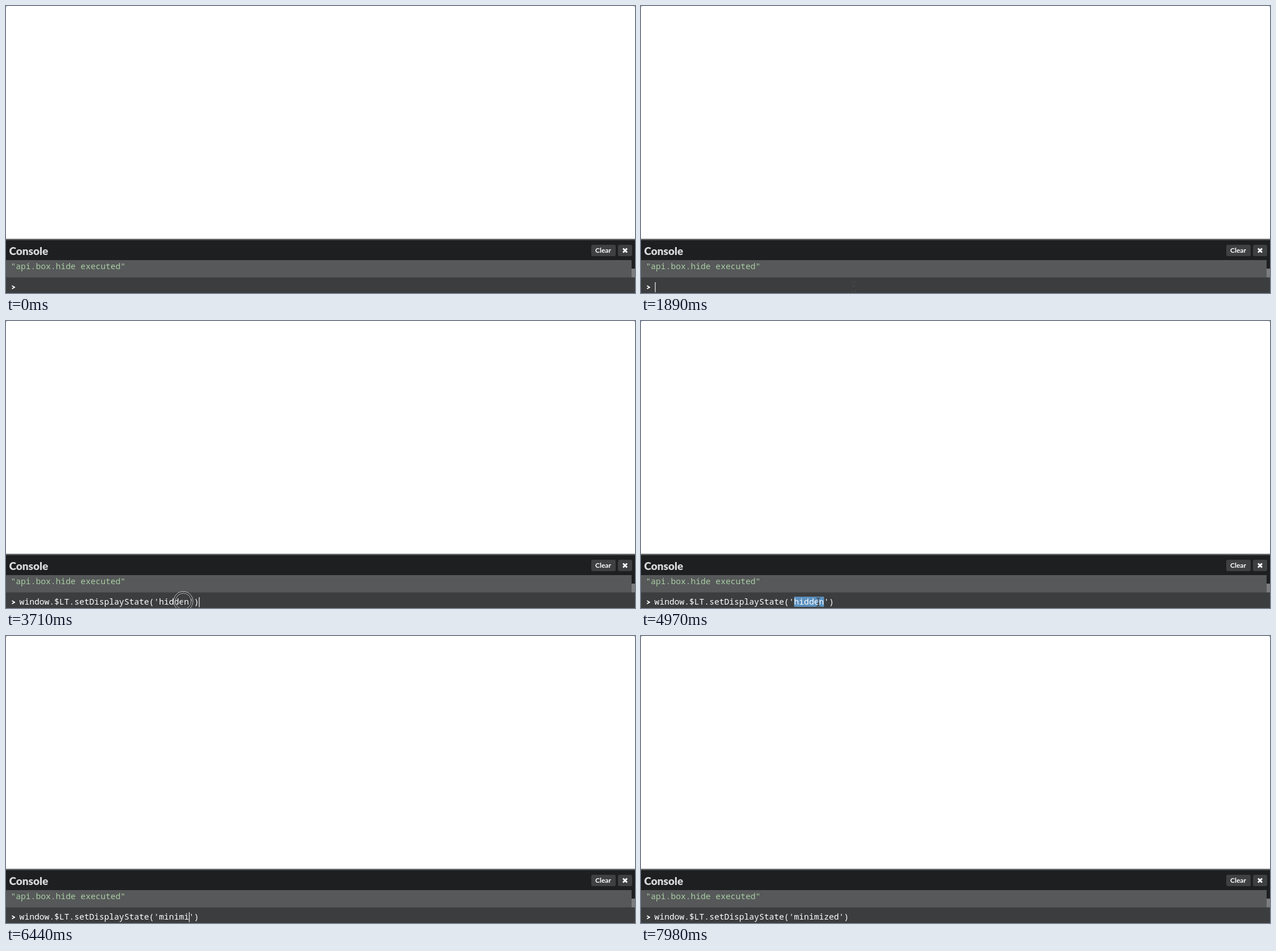
These frames come from a looping animation (1107x506 px, 8 s). An HTML page with a canvas:

```html
<!DOCTYPE html>
<html lang="en">
<head>
<meta charset="utf-8">
<title>Console</title>
<style>
html, body { margin: 0; width: 100%; height: 100%; overflow: hidden; background: #fff; }
canvas { display: block; width: 1107px; height: 506px; }
</style>
</head>
<body>
<canvas id="stage" width="1107" height="506"></canvas>
<script>
const ctx = document.getElementById('stage').getContext('2d');
const LOOP = 8000, STEP = 70;
const MONO = '14.63px "Noto Sans Mono", "DejaVu Sans Mono", monospace';
const CHAR = 8.78, INPUT_X = 23.6;
const HEAD = "window.$LT.setDisplayState('", TAIL = "')";

// [time, typed line, caret index or -1, selected?]
const arg = word => HEAD + word + TAIL;
const at = n => HEAD.length + n;
const lines = [
  [0, '', -1],
  [1400, '', 0],
  [2450, '', -1],
  [2800, '', 0],
  [3080, arg('hidden'), at(8)],
  [3780, arg('hidden'), at(5)],
  [3990, arg('hidden'), -1, true],
  [5040, arg(''), at(0)],
  [5250, arg('m'), at(1)],
  [5320, arg('mi'), at(2)],
  [5390, arg('min'), at(3)],
  [5600, arg('mini'), at(4)],
  [6090, arg('mini'), -1],
  [6300, arg('minim'), at(5)],
  [6440, arg('minimi'), at(6)],
  [6580, arg('minimiz'), at(7)],
  [6790, arg('minimize'), at(8)],
  [6930, arg('minimized'), at(9)],
  [7490, arg('minimized'), -1]
];

// Pointer moves: start, end, hide time, x from, x to
const moves = [
  [700, 980, 1540, 371, 381],
  [1540, 1610, 2590, 381, 374],
  [3150, 3640, 5040, 358, 312],
  [7350, 7630, 7980, 372, 395.5]
];
const clicks = [[700, 1050], [1820, 1890], [3640, 3850], [3920, 4200]];

function box(x, y, w, h, color, r = 0) {
  ctx.fillStyle = color;
  ctx.beginPath();
  ctx.roundRect(x, y, w, h, r);
  ctx.fill();
}

function label(text, x, y, font, color) {
  ctx.font = font;
  ctx.fillStyle = color;
  ctx.fillText(text, x, y);
}

function stroke(color, width, path) {
  ctx.strokeStyle = color;
  ctx.lineWidth = width;
  ctx.beginPath();
  path();
  ctx.stroke();
}

function panel() {
  box(0, 0, 1107, 506, '#3c3d3e');
  box(0, 0, 1107, 411, '#fff', [2, 2, 0, 0]);
  box(0, 410.5, 1107, 3, '#555657');
  box(0, 413, 1107, 35, '#1d1f20');
  label('Console', 5.5, 438.5, '900 19px Lato, sans-serif', '#d7dadb');

  box(1030, 421, 43, 20, '#3e4042', 3);
  label('Clear', 1037, 435, '700 12px Lato, sans-serif', '#fff');
  box(1077, 421, 25, 20, '#3e4042', 3);
  stroke('#fff', 2.8, () => {
    ctx.moveTo(1086, 427.5); ctx.lineTo(1093, 434.5);
    ctx.moveTo(1093, 427.5); ctx.lineTo(1086, 434.5);
  });

  box(0, 448, 1101, 30.5, '#565859');
  box(1101, 448, 6, 15, '#1d1f20');
  box(1101, 463, 6, 15.5, '#7c7d7e');
  label('"api.box.hide executed"', 8.5, 464, MONO, '#a8cba3');
  label('>', 9, 500.5, '900 14px Lato, sans-serif', '#fff');
}

function input(t) {
  const [, text, caret, selected] = lines.findLast(l => l[0] <= t);
  if (selected) box(INPUT_X + at(0) * CHAR, 486, 6 * CHAR, 18, '#5b90bf');
  label(text, INPUT_X, 500, '500 ' + MONO, '#fff');
  if (caret >= 0) box(INPUT_X + caret * CHAR + (caret ? -0.2 : 0.9), 487, 1.2, 17.5, '#f4f4f4');
}

function beam(x, y) {
  const path = () => {
    ctx.moveTo(x - 3.5, y - 7.5);
    ctx.quadraticCurveTo(x, y - 7.5, x, y - 5);
    ctx.quadraticCurveTo(x, y - 7.5, x + 3.5, y - 7.5);
    ctx.moveTo(x, y - 5);
    ctx.lineTo(x, y + 5);
    ctx.moveTo(x - 3.5, y + 7.5);
    ctx.quadraticCurveTo(x, y + 7.5, x, y + 5);
    ctx.quadraticCurveTo(x, y + 7.5, x + 3.5, y + 7.5);
    ctx.moveTo(x - 2, y + 2.5);
    ctx.lineTo(x + 2, y + 2.5);
  };
  stroke('rgba(255,255,255,.3)', 2.2, path);
  stroke('#161718', 1.1, path);
}

function ring(x, y) {
  const circle = r => () => ctx.arc(x, y, r, 0, Math.PI * 2);
  stroke('rgba(40,41,42,.6)', 2, circle(15.5));
  stroke('#c9caca', 1, circle(17));
  stroke('#b4b5b5', 1, circle(14));
}

function pointer(t) {
  const move = moves.find(m => t >= m[0] && t < m[2]);
  if (!move) return;
  const [start, end, , from, to] = move;
  const p = Math.min(1, (t - start) / (end - start));
  const x = from + (to - from) * p * (2 - p);
  beam(x, 495.5);
  if (clicks.some(c => t >= c[0] && t < c[1])) ring(x, 494);
}

function frame(now) {
  const t = Math.floor((now % LOOP) / STEP) * STEP;
  panel();
  input(t);
  pointer(t);
  requestAnimationFrame(frame);
}
requestAnimationFrame(frame);
</script>
</body>
</html>
```
